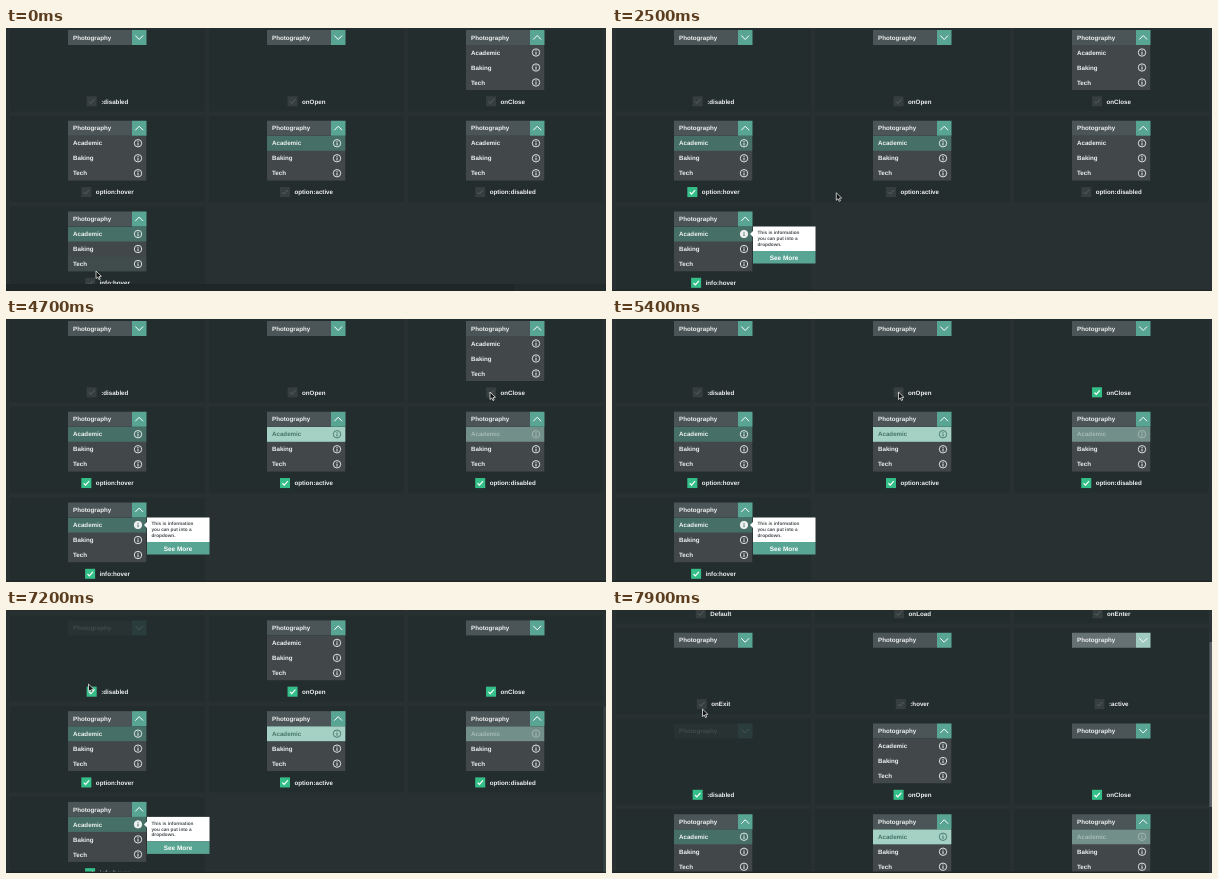
An HTML page with a canvas for the animation above (8000 ms loop, 600 by 263 pixels).

```html
<!DOCTYPE html>
<html lang="en">
<head>
<meta charset="utf-8">
<title>Dropdown states</title>
<style>
html, body { margin: 0; width: 600px; height: 263px; overflow: hidden; background: #272f30; }
canvas { display: block; }
</style>
</head>
<body>
<canvas id="stage" width="600" height="263"></canvas>
<script>
const ctx = document.getElementById('stage').getContext('2d');
const LOOP = 8000, PITCH = 90.75, ITEM = 15;
const TEAL = '#59a593', TEXT = '#eef1f0', HOVER = '#467067';
ctx.textRendering = 'geometricPrecision';

// time, x, y of the pointer tip
const pointerPath = [
  [0, 90, 243], [100, 90, 243], [400, 83, 252], [1150, 83, 252],
  [1500, 94.5, 142], [1800, 79, 164], [2100, 79, 164], [2700, 274.5, 165],
  [3300, 274.5, 165], [3700, 476.5, 163], [4000, 476.5, 163], [4400, 484, 73],
  [4900, 484, 73], [5400, 286.5, 73], [5800, 286.5, 73], [6550, 82.5, 77],
  [6900, 82.5, 77], [7200, 82.5, 74], [7800, 90, 98.5], [7900, 90.5, 99]
];

// label, time of its check
const cells = [
  [['Default'], ['onLoad'], ['onEnter']],
  [['onExit'], [':hover'], [':active']],
  [[':disabled', 6950], ['onOpen', 5600], ['onClose', 4700]],
  [['option:hover', 1950], ['option:active', 3000], ['option:disabled', 3900]],
  [['info:hover', 1000]]
];

const clamp = v => Math.max(0, Math.min(1, v));
const ease = v => { v = clamp(v); return v * v * (3 - 2 * v); };

function box(x, y, w, h, color) {
  ctx.fillStyle = color;
  ctx.fillRect(x, y, w, h);
}

function text(str, x, y, color = TEXT, size = 6.2, align = 'left') {
  ctx.font = `bold ${size}px "Liberation Sans", Arial, sans-serif`;
  ctx.textAlign = align;
  ctx.fillStyle = color;
  ctx.fillText(str, x, y + size * .36);
}

function line(points, color, width) {
  ctx.beginPath();
  points.forEach(([x, y]) => ctx.lineTo(x, y));
  ctx.strokeStyle = color;
  ctx.lineWidth = width;
  ctx.stroke();
}

function withAlpha(alpha, draw) {
  if (alpha <= 0) return;
  ctx.save();
  ctx.globalAlpha *= alpha;
  draw();
  ctx.restore();
}

function pointerAt(t) {
  const i = pointerPath.findIndex(p => p[0] > t);
  if (i < 0) return pointerPath[pointerPath.length - 1].slice(1);
  const [t0, x0, y0] = pointerPath[i - 1], [t1, x1, y1] = pointerPath[i];
  const k = ease((t - t0) / (t1 - t0));
  return [x0 + (x1 - x0) * k, y0 + (y1 - y0) * k];
}

function drawPointer([x, y]) {
  const shape = [[0, 0], [0, 7.5], [1.8, 6], [3, 8.6], [4.2, 8], [3.1, 5.5], [5.4, 5.3]];
  ctx.beginPath();
  shape.forEach(([dx, dy]) => ctx.lineTo(x + dx, y + dy));
  ctx.closePath();
  ctx.fillStyle = '#111';
  ctx.fill();
  ctx.strokeStyle = '#e4e6e6';
  ctx.lineWidth = .8;
  ctx.stroke();
}

function infoIcon(x, y, color, filled) {
  ctx.beginPath();
  ctx.arc(x, y, 3.7, 0, 7);
  ctx.lineWidth = .9;
  ctx.strokeStyle = ctx.fillStyle = color;
  ctx.stroke();
  if (filled) ctx.fill();
  const mark = filled ? HOVER : color;
  box(x - .5, y - 2.2, 1, 1, mark);
  box(x - .5, y - .6, 1, 2.8, mark);
}

function option(name, x, y, bg, color = TEXT, filled = false) {
  if (bg) box(x, y, 78.5, ITEM, bg);
  text(name, x + 5, y + 7.5, color);
  infoIcon(x + 70, y + 7.5, color, filled);
}

function tooltip(x, y) {
  box(x, y, 62.5, 24.5, '#fff');
  ctx.beginPath();
  [[0, 4.5], [-3, 7.5], [0, 10.5]].forEach(([dx, dy]) => ctx.lineTo(x + dx, y + dy));
  ctx.fillStyle = '#fff';
  ctx.fill();
  ['This is information', 'you can put into a', 'dropdown.'].forEach((row, i) =>
    text(row, x + 4.5, y + 6.3 + i * 5.7, '#454b4e', 4.7));
  box(x, y + 24.5, 62.5, 12.5, TEAL);
  text('See More', x + 31, y + 30.8, '#fff', 6.4, 'center');
}

function dropdown(x, y, label, on, open, pointer) {
  const active = label === ':active';
  if (open > 0) {
    ctx.save();
    ctx.beginPath();
    ctx.rect(x, y + ITEM, 78.5, 3 * ITEM * open);
    ctx.clip();
    box(x, y + ITEM, 78.5, 3 * ITEM, '#42474a');
    ['Academic', 'Baking', 'Tech'].forEach((name, i) => {
      const top = y + ITEM * (i + 1), [px, py] = pointer;
      const over = px > x && px < x + 78.5 && py > top && py < top + ITEM;
      option(name, x, top, over && '#3f4c4b');
    });
    const first = (bg, color, filled) => option('Academic', x, y + ITEM, bg, color, filled);
    if (label === 'info:hover') first(HOVER, TEXT, on > .5);
    if (label === 'option:active') first(HOVER);
    withAlpha(on, () => {
      if (label === 'option:hover') first(HOVER);
      if (label === 'option:active') first('#a5d1c5', '#457568');
      if (label === 'option:disabled') first('#738f89', '#a6bab5');
    });
    ctx.restore();
  }
  withAlpha(label === ':disabled' ? 1 - .87 * on : 1, () => {
    box(x, y, 64, ITEM, active ? '#667174' : '#4b5457');
    box(x + 64, y, 14.5, ITEM, active ? '#a0cabf' : TEAL);
    text('Photography', x + 5, y + 7.5);
    const cy = y + 7.5, dy = 2 * (1 - 2 * open);
    line([[x + 67.3, cy - dy], [x + 71.2, cy + dy], [x + 75.1, cy - dy]], '#fff', 1);
  });
  if (label === 'info:hover') withAlpha(on, () => tooltip(x + 79, y + ITEM));
}

function checkbox(center, y, label, on) {
  ctx.font = 'bold 6.2px "Liberation Sans", Arial, sans-serif';
  const x = center - (ctx.measureText(label).width + 14.5) / 2;
  const mark = [[x + 2.4, y + .2], [x + 4.2, y + 2], [x + 7.8, y - 2]];
  box(x, y - 5, 10, 10, '#363e3f');
  line(mark, '#596162', 1);
  withAlpha(on, () => {
    box(x, y - 5, 10, 10, '#34bf88');
    line(mark, '#fff', 1.2);
  });
  text(label, x + 14.5, y);
}

function draw(t) {
  const scroll = 111.5 * ease((t - 7080) / 720);
  const pointer = pointerAt(t);
  box(0, 0, 600, 263, '#283031');

  cells.forEach((row, r) => row.forEach(([label, checkTime = Infinity], c) => {
    const x = 62 + c * 199, y = 2 + (r - 2) * PITCH + scroll;
    const on = ease((t - checkTime) / 200);
    const motion = ease((t - checkTime) / 300);
    const open = label === 'onOpen' ? motion : label === 'onClose' ? 1 - motion : r > 2 ? 1 : 0;
    box(x - 58, y - 5, 195, 86.3, '#242d2e');
    dropdown(x, y, label, on, open, pointer);
    checkbox(x + 39.5, y + 71.3, label, on);
  }));

  // browser chrome: bottom edge, sliding status strip, scrollbar
  box(0, 261.5, 600, 1.5, '#1f2627');
  const strip = 256 + 8 * ease((t - 100) / 300);
  box(0, strip, 600, 8, '#232a2b');
  box(0, strip, 508, 8, '#1f2627');
  withAlpha(clamp((t - 7100) / 300), () => {
    box(597, 0, 3, 263, '#2b3334');
    box(597.5, 102 - scroll * 70 / 111.5, 2.5, 165, '#5b6364');
  });
  drawPointer(pointer);
}

function frame() {
  draw(performance.now() % LOOP);
  requestAnimationFrame(frame);
}
frame();
</script>
</body>
</html>
```
